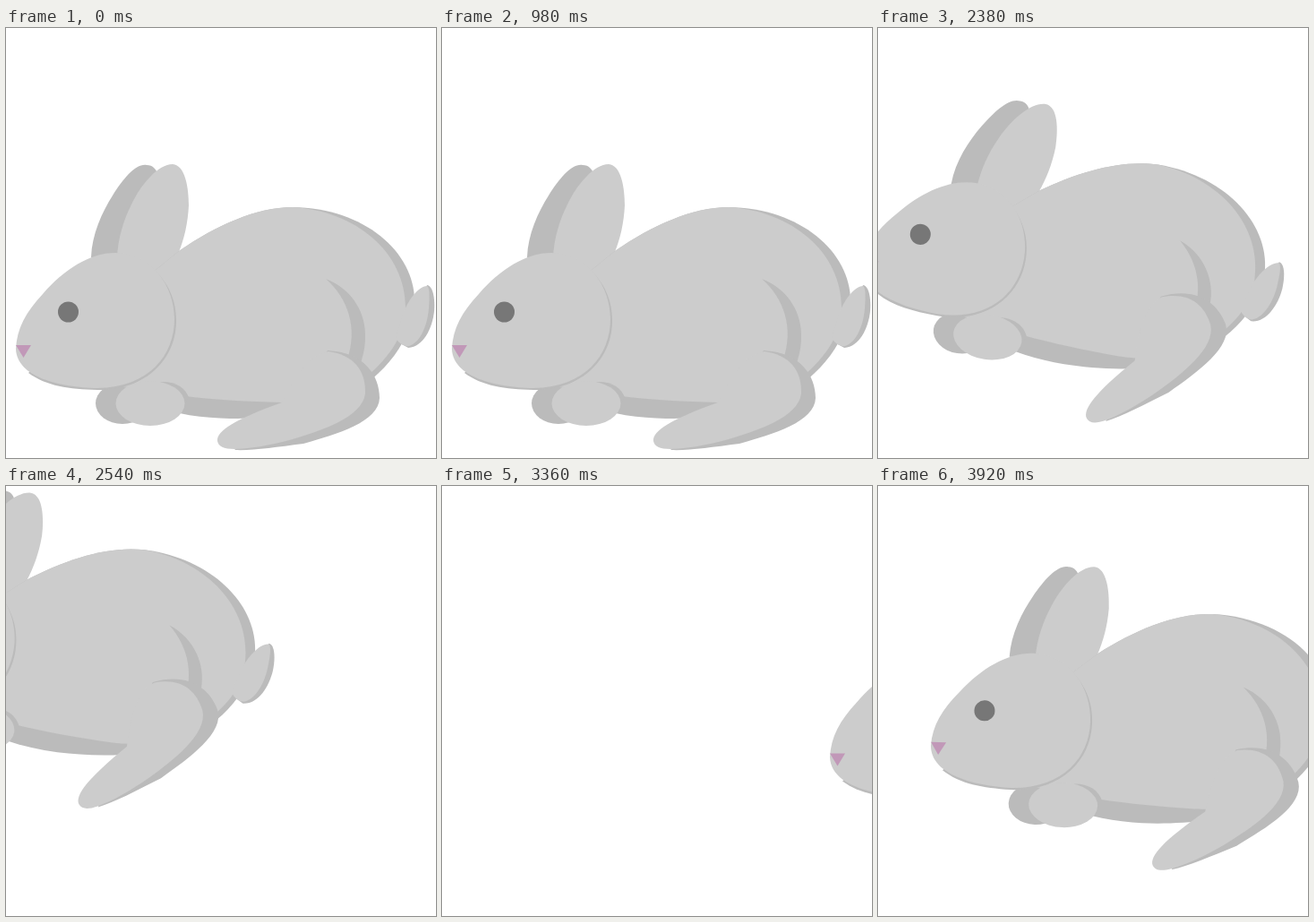
An HTML page for the animation above (4000 ms loop, 480x480 px).

```html
<!DOCTYPE html>
<html lang="en">
<head>
<meta charset="utf-8">
<title>Rabbit</title>
<style>
  html, body { margin: 0; width: 100%; height: 100%; overflow: hidden; background: #fff; }
  svg { display: block; width: 100vw; height: 100vh; }
  .light { fill: #ccc; }
  .dark { fill: #bbb; }
</style>
</head>
<body>
<svg viewBox="0 0 480 480">
  <g id="rabbit">
    <!-- ears -->
    <path class="dark" d="M95 256C96 230 107 206 119 187C131 168 145 151 157 153C164 153 168 158 169 163L130 256Z"/>
    <path class="light" d="M124 256C125 235 131 215 140 197C151 174 170 152 186 152C200 153 204 178 204 198C203 218 199 235 193 250L160 285Z"/>
    <!-- far paw -->
    <ellipse class="dark" cx="130" cy="419" rx="30" ry="23"/>
    <!-- body -->
    <path class="dark" d="M193 249C235 220 280 200 320 200C400 201 456 250 456 305C455 347 423 388 378 413C340 431 290 436 250 436C220 435 190 432 160 420L130 300Z"/>
    <path class="light" d="M193 249C235 220 280 200 320 200C390 204 446 250 446 312C446 345 425 372 395 395C370 415 330 418 308 418C270 417 235 415 200 411L130 400V300Z"/>
    <!-- tail -->
    <path class="dark" d="M470 287C477 288 479 303 478 316C476 335 466 356 449 357L440 352Z"/>
    <path class="light" d="M470 288C460 288 448 305 443 320L435 346C439 353 446 356 450 355C463 351 471 330 472 312C473 300 473 290 470 288Z"/>
    <!-- thigh and hind leg -->
    <path class="dark" d="M357 280C388 292 402 320 401 345C401 358 398 368 394 380L381 370C393 335 382 302 357 280Z"/>
    <g id="leg">
      <path class="dark" d="M359 360C400 362 417 388 417 413C416 440 370 453 332 464C300 468 275 472 255 471L300 430Z"/>
      <path class="light" d="M236 461C235 450 255 437 308 418C320 395 335 365 360 361C388 365 402 382 401 408C398 435 350 450 320 459C295 466 270 470 255 470C243 470 237 467 236 461Z"/>
    </g>
    <!-- near paw -->
    <path class="dark" d="M172 395C190 394 200 402 204 412L199 422Z"/>
    <ellipse class="light" cx="161" cy="419" rx="38.500" ry="25"/>
    <!-- head -->
    <path id="shade" class="dark"/>
    <path id="head" class="light"/>
    <circle cx="69.500" cy="317" r="11.500" fill="#777"/>
    <path id="nose" d="M11 354H28L19.500 368Z" fill="#c198b8"/>
  </g>
</svg>
<script>
const el = id => document.getElementById(id);
const STEP = 80, LOOP = 4000;

// linear path through a few [step, value] points
function along(k, ...points) {
  const i = Math.max(1, points.findIndex(p => p[0] >= k));
  const [k0, v0] = points[i - 1], [k1, v1] = points[i];
  return v0 + (v1 - v0) * (k - k0) / (k1 - k0);
}

// push off with the head raised, then glide out to the left
function hopOut(k) {
  return {
    x: -77.2 * Math.max(0, k - 2.7),
    y: -150 * Math.sin(0.3817 * Math.max(0, k - 1.922)),
    turn: along(k, [0, 0], [1, 1], [3, 8.7], [9, 3.2]),
    kick: along(k, [0, 0], [1, -2], [3, -28], [9, -23])
  };
}

// steady glide in from the right along a parabola
function hopIn(k) {
  const p = (k + 0.92) / 8.92;
  return {
    x: 422 - 53.2 * k,
    y: -600 * p * (1 - p),
    turn: 5.5 * Math.sin(Math.PI * k / 8),
    kick: along(k, [0, -26], [5, -26], [7, -17])
  };
}

function setPose({ x, y, turn, kick }, breath) {
  el('rabbit').setAttribute('transform',
    `translate(${x} ${y}) rotate(${turn} 245 310) translate(0 471) scale(1 ${1 + 0.0125 * breath}) translate(0 -471)`);
  el('leg').setAttribute('transform', `rotate(${kick} 322 380)`);
}

function setMuzzle(k) {
  const x = 11 + 2 * k, y = 358 - 4 * k;
  el('head').setAttribute('d',
    `M${x} ${y}C${x + 1} ${y - 22} 22 317 41 297C65 269 94 251 122 251C165 252 188 290 188 325` +
    `C188 365 160 401 102 402C60 401 ${x + 1} ${y + 32} ${x} ${y}Z`);
  el('shade').setAttribute('d',
    `M160 265C182 283 190 305 190 327C190 370 155 405 102 404C70 403 ${40 + x / 2} ${y + 42} ${x + 14} ${y + 27}Z`);
  el('nose').setAttribute('transform', `translate(${2 * k} ${-4 * k})`);
}

function draw(t) {
  const step = from => Math.floor((t - from) / STEP);
  const pulse = (from, n) => {
    const k = step(from) + 1;
    return k > 0 && k < n ? Math.sin(Math.PI * k / n) : 0;
  };
  let pose = { x: 0, y: 0, turn: 0, kick: 0 };
  if (t >= 3360) pose = hopIn(Math.min(step(3360), 7));
  else if (t >= 2220) pose = hopOut(Math.min(step(2220) + 1, 9));
  setPose(pose, pulse(500, 7));
  setMuzzle(pulse(1480, 4));
}

const start = performance.now();
function tick() {
  draw((performance.now() - start) % LOOP);
  requestAnimationFrame(tick);
}
tick();
</script>
</body>
</html>
```
